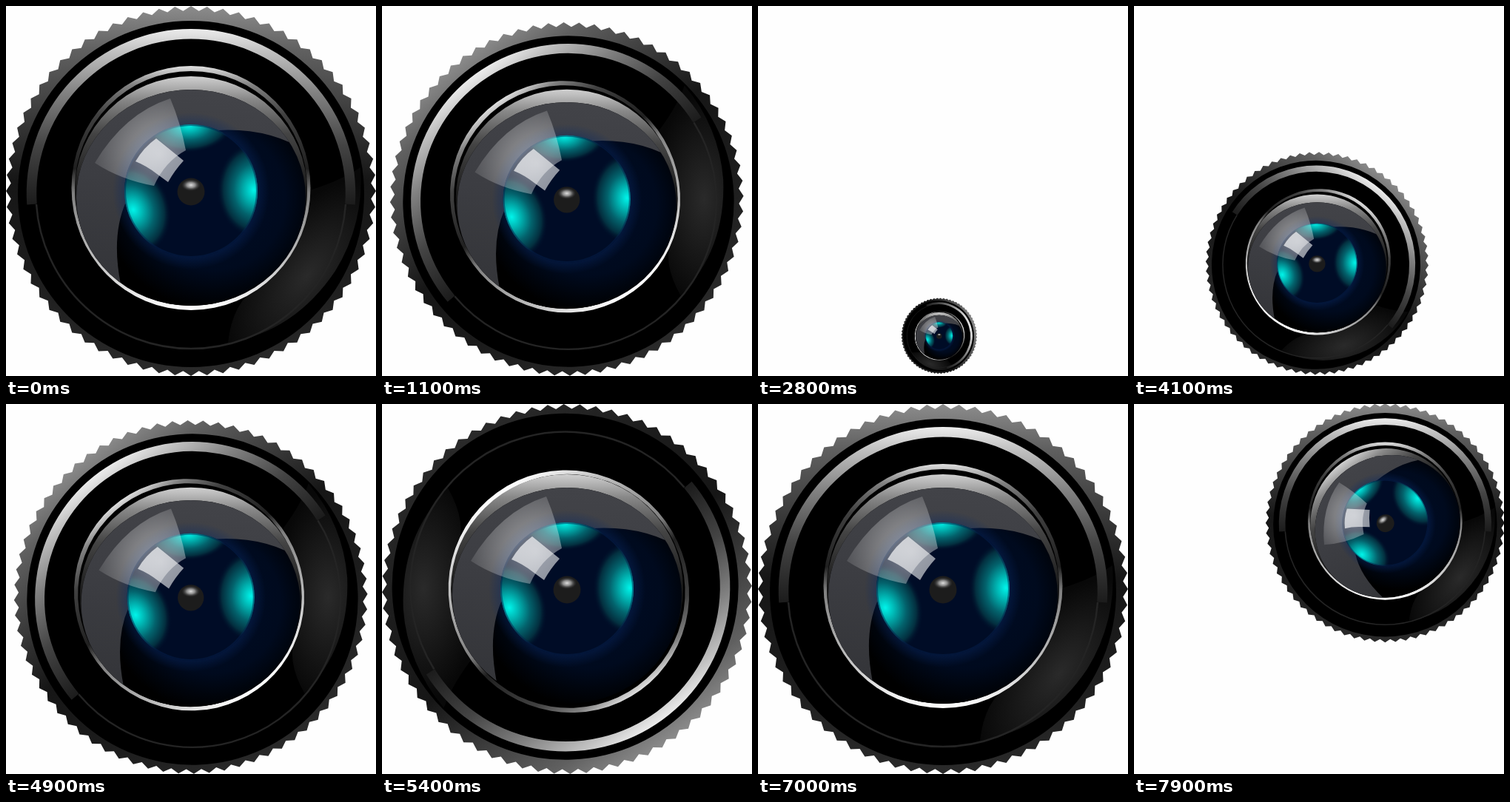
An HTML page for the animation above (8 s loop, 500 by 500 pixels).

```html
<!DOCTYPE html>
<html lang="en">
<head>
<meta charset="utf-8">
<title>Camera lens</title>
<style>
  html, body { margin: 0; width: 100%; height: 100%; overflow: hidden; background: #fefefe; }
  svg { display: block; width: 100vw; height: 100vh; }
</style>
</head>
<body>
<svg viewBox="0 0 500 500">
  <defs>
    <linearGradient id="rim" gradientUnits="userSpaceOnUse" x1="0" y1="-250" x2="0" y2="250">
      <stop offset="0" stop-color="#8c8c8c"/>
      <stop offset=".12" stop-color="#606060"/>
      <stop offset=".3" stop-color="#3a3a3a"/>
      <stop offset=".47" stop-color="#161616"/>
      <stop offset=".7" stop-color="#1c1c1c"/>
      <stop offset="1" stop-color="#2a2a2a"/>
    </linearGradient>
    <linearGradient id="band" gradientUnits="userSpaceOnUse" x1="0" y1="-222" x2="0" y2="222">
      <stop offset="0" stop-color="#f0f0f0"/>
      <stop offset=".07" stop-color="#c4c4c4"/>
      <stop offset=".2" stop-color="#828282"/>
      <stop offset=".36" stop-color="#444"/>
      <stop offset=".54" stop-color="#1c1c1c"/>
    </linearGradient>
    <radialGradient id="sheen" gradientUnits="userSpaceOnUse" cx="0" cy="0" r="1"
      gradientTransform="translate(157 114) rotate(-53) scale(150 75)">
      <stop offset="0" stop-color="#2a2a2a"/>
      <stop offset=".5" stop-color="#191919"/>
      <stop offset="1" stop-color="#080808"/>
    </radialGradient>
    <linearGradient id="collar" gradientUnits="userSpaceOnUse" x1="0" y1="-169" x2="0" y2="161">
      <stop offset="0" stop-color="#e0e0e0"/>
      <stop offset=".08" stop-color="#808080"/>
      <stop offset=".2" stop-color="#404040"/>
      <stop offset=".42" stop-color="#202020"/>
      <stop offset=".52" stop-color="#808080"/>
      <stop offset=".8" stop-color="#c0c0c0"/>
      <stop offset="1" stop-color="#fff"/>
    </linearGradient>
    <linearGradient id="bezel" gradientUnits="userSpaceOnUse" x1="0" y1="-155" x2="0" y2="155">
      <stop offset="0" stop-color="#d0d0d0"/>
      <stop offset=".1" stop-color="#888"/>
      <stop offset=".25" stop-color="#444"/>
      <stop offset=".5" stop-color="#181818"/>
      <stop offset="1" stop-color="#000"/>
    </linearGradient>
    <radialGradient id="depth" gradientUnits="userSpaceOnUse" cx="30" cy="10" r="150">
      <stop offset="0" stop-color="#000d28"/>
      <stop offset=".65" stop-color="#000a1e"/>
      <stop offset=".85" stop-color="#00040c"/>
      <stop offset="1" stop-color="#000"/>
    </radialGradient>
    <linearGradient id="panel" gradientUnits="userSpaceOnUse" x1="0" y1="-137" x2="-40" y2="130">
      <stop offset="0" stop-color="#424348"/>
      <stop offset=".5" stop-color="#3c3d42"/>
      <stop offset="1" stop-color="#343539"/>
    </linearGradient>
    <radialGradient id="halo">
      <stop offset=".8" stop-color="#0a2a66" stop-opacity=".5"/>
      <stop offset="1" stop-color="#0a2a66" stop-opacity="0"/>
    </radialGradient>
    <radialGradient id="cyan">
      <stop offset="0" stop-color="#00f4ea"/>
      <stop offset=".25" stop-color="#00b4b2"/>
      <stop offset=".55" stop-color="#03626c"/>
      <stop offset=".82" stop-color="#032f3f"/>
      <stop offset="1" stop-color="#000d28" stop-opacity="0"/>
    </radialGradient>
    <radialGradient id="glare" gradientUnits="userSpaceOnUse" cx="-42" cy="-50" r="95">
      <stop offset="0" stop-color="#fff" stop-opacity=".5"/>
      <stop offset=".45" stop-color="#fff" stop-opacity=".33"/>
      <stop offset="1" stop-color="#fff" stop-opacity=".08"/>
    </radialGradient>
    <linearGradient id="pane" gradientUnits="userSpaceOnUse" x1="-60" y1="-62" x2="-18" y2="-24">
      <stop offset="0" stop-color="#fff" stop-opacity=".68"/>
      <stop offset="1" stop-color="#fff" stop-opacity=".56"/>
    </linearGradient>
    <radialGradient id="spark">
      <stop offset="0" stop-color="#ddd"/>
      <stop offset=".45" stop-color="#888"/>
      <stop offset="1" stop-color="#333" stop-opacity="0"/>
    </radialGradient>
    <clipPath id="glass"><ellipse cy="9" rx="155" ry="146"/></clipPath>
    <clipPath id="iris"><circle r="90"/></clipPath>
  </defs>

  <g id="camera">
    <g id="body">
      <path id="teeth" fill="url(#rim)"/>
      <circle cy="4" r="234"/>
      <path d="M50 205Q56 150 90 130L150 2Q200 -12 229 -32A231 231 0 0 1 195 108Q140 190 50 205Z" fill="url(#sheen)"/>
      <path d="M-215 18A215.5 215.5 0 1 1 215 18" fill="none" stroke="url(#band)" stroke-width="13.5"/>
      <path d="M-209 18A209.5 209.5 0 0 0 209 18" fill="none" stroke="#242424" stroke-width="2.5"/>
      <ellipse cy="-4" rx="161.5" ry="165" fill="url(#collar)"/>
      <ellipse cy="-3.5" rx="157" ry="158.5"/>
    </g>
    <g id="lens">
      <ellipse rx="157" ry="155" fill="url(#bezel)"/>
      <g clip-path="url(#glass)">
        <rect x="-160" y="-160" width="320" height="320" fill="url(#depth)"/>
        <path d="M-160 -160H160V-50Q110 -86 35 -82Q-40 -60 -88 15Q-108 60 -95 126L-160 150Z" fill="url(#panel)"/>
      </g>
      <circle r="106" fill="url(#halo)"/>
      <circle r="90" fill="#000c26"/>
      <g id="blobs" clip-path="url(#iris)"></g>
      <circle r="89" fill="none" stroke="#06204c" stroke-width="2" opacity=".5"/>
      <path d="M-28 -125Q-90 -105 -130 -38Q-95 -15 -50 -7Q-35 -40 -7 -55Q-14 -92 -28 -125Z" fill="url(#glare)"/>
      <path d="M-47 -71L-10 -41Q-22 -28 -31 -12L-46 -23Q-60 -34 -75 -40Q-64 -59 -47 -71Z" fill="url(#pane)"/>
      <circle cy="1" r="18.5" fill="#1c1c1c"/>
      <ellipse cy="-8" rx="13" ry="8" fill="url(#spark)"/>
    </g>
  </g>
</svg>
<script>
const $ = id => document.getElementById(id);
const LOOP = 8000, STEP = 100, TEETH = 72, SPIN = 36;

// Shallow pointed teeth
function toothPath() {
  const pts = [];
  for (let i = 0; i < TEETH * 2; i++) {
    const a = i / TEETH * Math.PI;
    const r = i % 2 ? 243.5 : 250;
    pts.push((r * Math.sin(a)).toFixed(2) + ' ' + (-r * Math.cos(a)).toFixed(2));
  }
  return 'M' + pts.join('L') + 'Z';
}

// Blob: direction in degrees, distance, half depth, half breadth
function blob([angle, dist, depth, breadth]) {
  return `<ellipse cx="${dist}" rx="${depth}" ry="${breadth}" fill="url(#cyan)" transform="rotate(${angle})"/>`;
}

$('teeth').setAttribute('d', toothPath());
$('blobs').innerHTML = [[-1, 85, 50, 64], [162, 82, 50, 62], [-92, 89, 37, 60]].map(blob).join('');

// Pose on a 100 ms grid: shrink to the bottom, grow back, spin, shrink to the corner
function pose(t) {
  const n = Math.floor(t / STEP);
  if (n < 10) return { drop: 0, dx: 0, dy: 0, body: 0, lens: 0 };
  if (n < 50) {
    const k = n < 30 ? n - 10 : 50 - n;
    return { drop: 11.04 * k, dx: -0.026, dy: 0.985, body: -SPIN * k, lens: 0 };
  }
  if (n < 70) return { drop: 0, dx: 0, dy: 0, body: SPIN * (n - 50), lens: 0 };
  const k = n - 70;
  return { drop: 9.83 * k, dx: 1.01, dy: -1.01, body: 0, lens: SPIN * k };
}

function draw(t) {
  const p = pose(t);
  const x = 250 + p.dx * p.drop, y = 250 + p.dy * p.drop;
  $('camera').setAttribute('transform', `translate(${x} ${y}) scale(${1 - p.drop / 250})`);
  $('body').setAttribute('transform', `rotate(${p.body})`);
  $('lens').setAttribute('transform', `rotate(${p.lens})`);
}

const start = performance.now();
function tick() {
  draw((performance.now() - start) % LOOP);
  requestAnimationFrame(tick);
}
tick();
</script>
</body>
</html>
```
